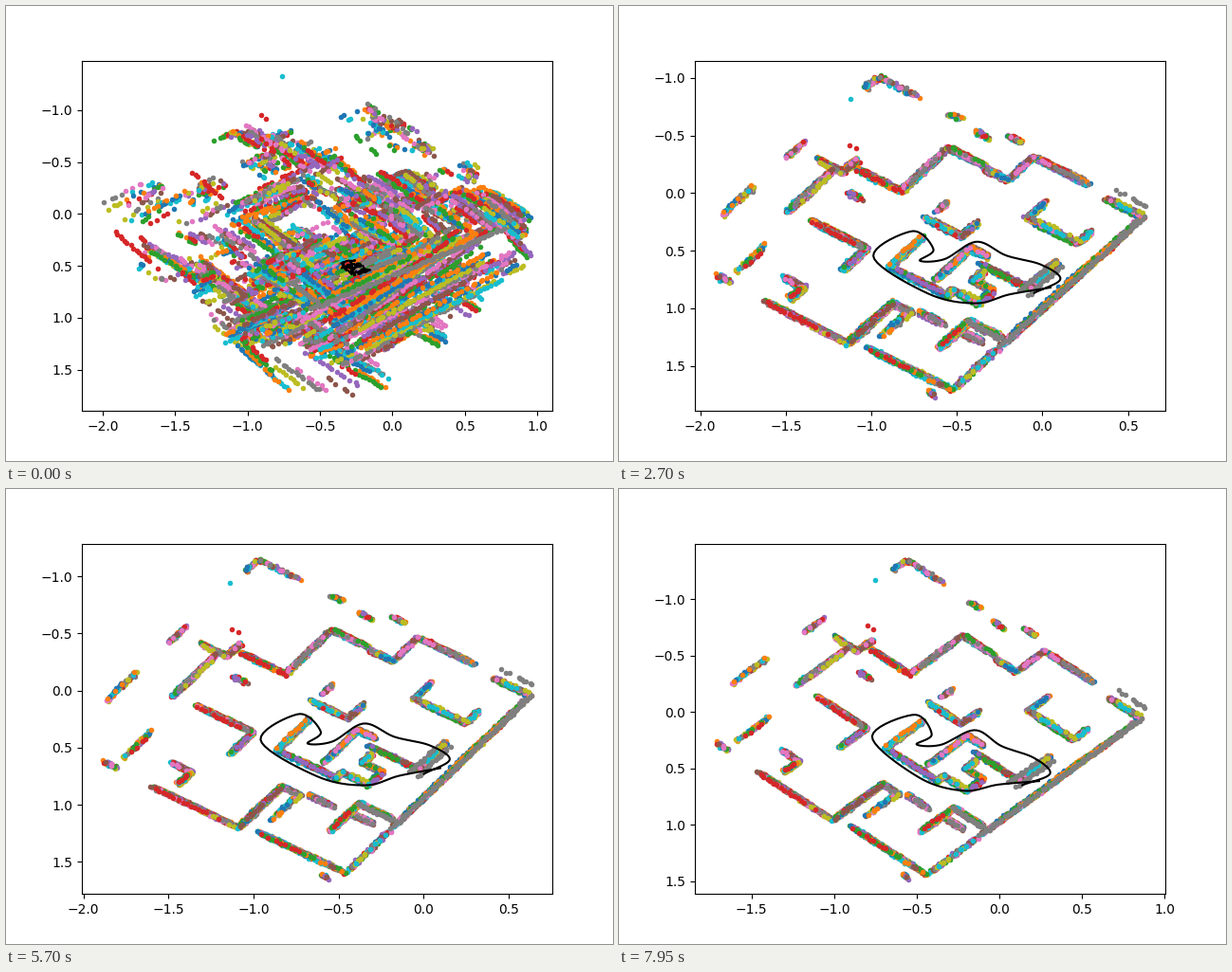
A matplotlib script that plays this animation: 640x480 px, repeating every 8000 ms.

```python
import numpy as np
import matplotlib.pyplot as plt
from matplotlib.animation import FuncAnimation

rng = np.random.default_rng(12)
SCANS = 130
HOLD = 3  # 50 ms ticks per optimisation step
SCALE, ORIGIN = np.array([178, 120]), np.array([440.5, 212.5])
HOUSE = np.radians(35)
ALONG = np.array([np.cos(HOUSE), np.sin(HOUSE)])
ACROSS = np.array([np.sin(HOUSE), -np.cos(HOUSE)])

# A wall starts at a stage pixel and turns at right angles:
# x, y, length along the house, length across it, along, ...
ROOMS = [
    (177, 218, 0, .45),
    (207, 163, .19, .13),
    (250, 173, .31, .47, .27),
    (385, 170, .16, .25, .41),
    (448, 204, 0, -.17, .37, .12),
    (322, 223, .27, .15),
    (200, 227, .42, -.24),
    (320, 242, 0, -.33, .43, .06, .19, .14, -.14, .09),
    (334, 289, 0, .36, .12),
    (382, 270, .36, .29),
    (176, 288, .14, -.13),
    (153, 312, .64, .44, .14),
    (320, 322, .18),
    (342, 360, 0, .3, .25),
    (366, 342, .15),
    (267, 361, .64),
    (514, 199, .26, -1.42),
]
FAINT = [
    (253, 87, 0, .13, .3),
    (344, 113, .09),
    (370, 129, .11),
    (406, 134, .1),
    (173, 162, 0, .18),
    (104, 286, .1),
    (126, 283, 0, .29),
    (108, 222, 0, .3),
    (241, 197, .1),
    (334, 216, 0, .1),
    (280, 349, 0, .29),
    (333, 406, .06),
    (362, 402, 0, .42),
]
# Walls of the latest scans, which lie on top.
LATEST = {
    "C3": [(252, 176, .3), (203, 231, .3), (160, 317, .45), (326, 226, .23),
           (238, 148, .06)],
    "C2": [(345, 148, .23), (395, 277, .25)],
    "C6": [(345, 278, 0, .25, .12)],
    "C1": [(286, 273, 0, .3)],
    "C9": [(236, 99, .01)],
    "C7": [(521, 190, .22), (435, 303, 0, .32), (426, 298, 0, .25),
           (552, 218, 0, -1.42), (371, 331, .25)],
}
ROUTE = [(458, 294), (415, 302), (380, 312), (330, 303), (270, 265), (310, 237),
         (333, 256), (319, 268), (345, 266), (378, 247), (410, 261), (447, 270),
         (468, 285), (441, 300)]

# Drift of the whole map: its centre and its turn in degrees.
KEY_STEPS = [10, 18, 29, 38, 47, 53]
CENTER_X = [-.71, -.635, -.66, -.6025, -.571, -.405]
CENTER_Y = [.587, .464, .365, .337, .256, .174]
TURN = [0, 1.5, -.6, 0, 2.1, 8.2]
MIDDLE = np.array([-.6025, .337])
# Before the first step all poses are heaped up at one place.
HEAP = np.array([-.25, .52])
FIRST_LOW, FIRST_HIGH = np.array([-1.996, -1.325]), np.array([.957, 1.745])


def to_data(pixels):
    return (np.array(pixels, float) - ORIGIN) / SCALE


def segments(shapes):
    for x, y, *lengths in shapes:
        p = to_data((x, y))
        for n, length in enumerate(lengths):
            q = p + length * (ACROSS if n % 2 else ALONG)
            if length:
                yield p, q, abs(length)
            p = q


def spline(points, count):
    """Catmull-Rom curve through the points."""
    p = np.vstack([2 * points[0] - points[1], points, 2 * points[-1] - points[-2]])
    t = np.linspace(0, len(points) - 1, count)
    i = np.minimum(t.astype(int), len(points) - 2)
    f = (t - i)[:, None]
    a, b, c, d = (p[i + n] for n in range(4))
    return b + f / 2 * (c - a + f * (2 * a - 5 * b + 4 * c - d
                                     + f * (3 * (b - c) + d - a)))


def smooth_noise(width):
    raw = rng.normal(size=SCANS + 2 * width)
    return np.convolve(raw, np.ones(width) / width ** .5, "same")[width:-width]


def rotate(p, angle):
    c, s = np.cos(angle), np.sin(angle)
    x, y = p.T
    return np.stack([x * c - y * s, x * s + y * c], axis=1)


def observe(a, b, length, faint):
    """Add one wall to a window of consecutive scans around the nearest pose."""
    window = 18 if faint else 36
    nearest = np.argmin(np.hypot(*(route - (a + b) / 2).T))
    first = nearest - window // 2 + rng.integers(-30, 31)
    for scan in np.arange(first, first + window) % SCANS:
        if faint:
            t = rng.random(int(length / .08) + 1)
        else:
            span = rng.uniform(.4, 1)
            t = rng.uniform(0, 1 - span) + span * np.linspace(
                0, 1, int(span * length / .027) + 2)
            t = t[rng.random(t.size) < .75]
        hits[scan].append(a + t[:, None] * (b - a))


route = spline(to_data(ROUTE), SCANS)
hits = [[] for _ in range(SCANS)]
for shapes, faint in ((ROOMS, False), (FAINT, True)):
    for wall in segments(shapes):
        observe(*wall, faint)
colors = [f"C{i % 10}" for i in range(SCANS)]
for color, shapes in LATEST.items():
    gap, keep = (.016, .9) if color == "C7" else (.027, .65)
    group = []
    for a, b, length in segments(shapes):
        t = np.linspace(0, 1, int(length / gap) + 1)
        t = t[rng.random(t.size) < keep]
        group.append(a + t[:, None] * (b - a))
    hits.append(group)
    colors.append(color)
hits = [np.concatenate(h) if h else np.zeros((0, 2)) for h in hits]
sizes = [len(h) for h in hits]
cuts = np.cumsum(sizes)[:-1]
walls = np.concatenate(hits)
owner = np.minimum(np.repeat(np.arange(len(hits)), sizes), SCANS - 1)

scribble = np.stack([smooth_noise(3), smooth_noise(3)], axis=1) * .015
drift = np.stack([smooth_noise(5), smooth_noise(5)], axis=1)
drift = .004 * (drift + rng.normal(size=drift.shape))
drift[-1] = 0
twist = smooth_noise(4) * .002
tilt = np.radians(17 + 7 * smooth_noise(30))
grain = rng.normal(size=walls.shape) * .004


def solve(step):
    """Wall points, route and the box of the data after a number of steps."""
    collapse = np.exp(-1.2 * step)
    settle = np.exp(-max(step - 10, 0) / 10)
    spread = .9 + 1.8 * settle
    center = np.array([np.interp(step, KEY_STEPS, k) for k in (CENTER_X, CENTER_Y)])
    turn = np.radians(np.interp(step, KEY_STEPS, TURN))

    def place(p):
        return center + (1 - .03 * settle) * rotate(p - MIDDLE, turn)

    box = place(walls)
    low, high = box.min(axis=0), box.max(axis=0)
    sight = rotate(walls - route[owner], spread * twist[owner])
    sight += spread * drift[owner] + grain
    pose = place(route)
    points = place(route[owner] + sight) - pose[owner]
    points = rotate(points, collapse * tilt[owner])
    heap = HEAP + .17 * (pose - pose.mean(axis=0)) + scribble
    pose = pose + collapse * (heap - pose)

    # Stretch each side of the heap to the extent of the first view.
    rel = points + pose[owner] - HEAP
    stretch = np.where(rel < 0, (FIRST_LOW - HEAP) / rel.min(axis=0),
                       (FIRST_HIGH - HEAP) / rel.max(axis=0))
    points = HEAP + rel * (1 + collapse * (stretch - 1))
    low = low + collapse * (FIRST_LOW - low)
    high = high + collapse * (FIRST_HIGH - high)
    return points, pose, low, high


fig, ax = plt.subplots(figsize=(6.4, 4.8), dpi=100)
dots = [ax.plot([], [], ".", color=c, markersize=8, markeredgewidth=0)[0]
        for c in colors]
trail, = ax.plot([], [], "k-", lw=1.5)


def update(tick):
    points, pose, low, high = solve(tick // HOLD)
    for line, part in zip(dots, np.split(points, cuts)):
        line.set_data(*part.T)
    trail.set_data(*pose.T)
    margin = .05 * (high - low)
    (left, top), (right, bottom) = low - margin, high + margin
    ax.set_xlim(left, right)
    ax.set_ylim(bottom, top)
    return [*dots, trail]


anim = FuncAnimation(fig, update, frames=160, interval=50, repeat=True,
                     repeat_delay=0, init_func=lambda: update(0))
plt.show()
```
